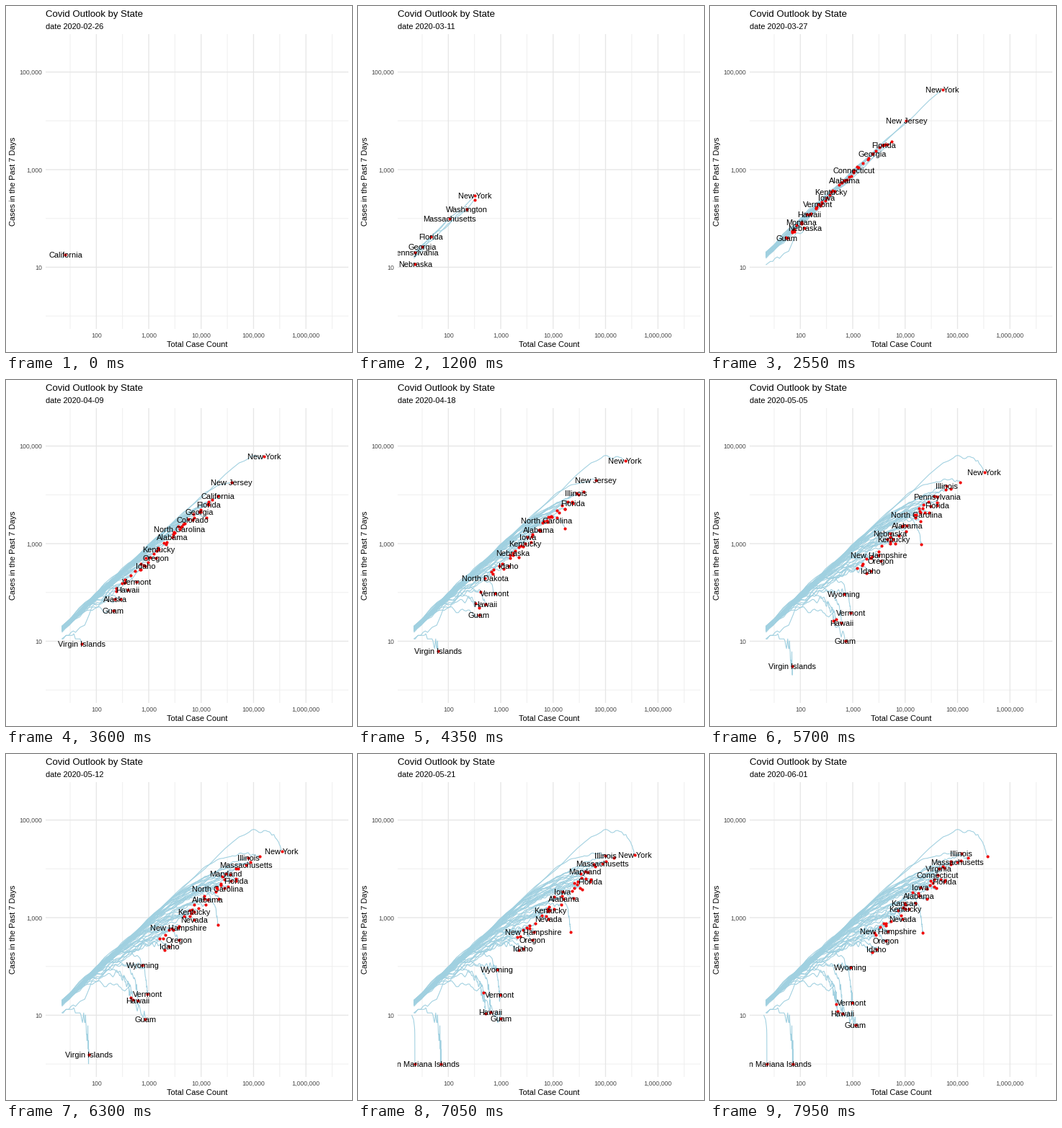
Recreate the animation shown at these times as a matplotlib script. Size 480 px wide and 480 px high, loop 8000 ms.

```python
import numpy as np
import matplotlib.pyplot as plt
from matplotlib.animation import FuncAnimation
from matplotlib.collections import LineCollection

plt.rcParams["font.family"] = "Liberation Sans"

SIZE, INTERVAL, TICKS = 480, 50, 160
LEFT, RIGHT, TOP, BOTTOM = 55, 474.5, 39, 447.5
X_DECADE, Y_DECADE = 72.7, 67.7
DAYS_PER_STEP, LAST_STEP = 180 / 99, 53
SLOWDOWN, END = 30.9, 96.4      # days: growth starts to ease, last day shown
FIRST_TOTAL = 22
LABEL_HEIGHT = 7.6

rng = np.random.default_rng(7)
states = []


def x_of(total):
    return 125.3 + X_DECADE * (np.log10(total) - 2)


def y_of(weekly):
    return 362 - Y_DECADE * (np.log10(weekly) - 1)


def add_state(name, early, late, since=None, drop=None):
    """Path from totals on the slowdown day and the last day.

    Growth is exponential from day `since`, then decays. The weekly count falls
    below the total by `drop` pixels, more where the growth left is small.
    """
    x_first, x_early, x_late = x_of(FIRST_TOTAL), x_of(early), x_of(late)
    if since is None:
        since = SLOWDOWN - (x_early - x_first) / (5 + (x_early - x_first) / 32)
    days = np.concatenate([[since], np.arange(np.floor(since) + 1, 99)])

    peak = max(SLOWDOWN, since)
    rate = (x_early - x_first) / max(peak - since, 1)
    after = np.clip(days - peak, 0, END - peak)
    span = x_late - x_early
    k = np.clip(4 / span, 0.03, 1)
    eased = (1 - np.exp(-k * after)) / (1 - np.exp(-k * (END - peak)))
    x = x_early - rate * np.maximum(peak - days, 0) + span * eased

    # A steady rate fixes the share of all cases that fall in one week.
    early_drop = -Y_DECADE * np.log10(1 - 10 ** (-7 * max(rate, 3) / X_DECADE))
    late_drop = drop or min(6 + 5200 / span, 125)
    fall = np.sin(np.pi / 2 * after / (END - peak))
    total = 10 ** (2 + (x - 125.3) / X_DECADE)
    gap = early_drop + (late_drop - early_drop) * fall
    weekly = total * 10 ** (-gap / Y_DECADE)

    noise = np.convolve(rng.normal(size=len(days) + 2), [0.5, 0.7, 0.5], "valid")
    sigma = np.minimum(0.012 + 0.25 / np.sqrt(weekly), 0.2)
    ramp = np.minimum((days - since) / 6, 1)
    weekly = np.maximum(np.round(weekly * 10 ** (sigma * noise * ramp)), 1)
    states.append((name, days, np.column_stack([x, y_of(weekly)])))


# Totals in late March and on 1 June; earlier states win when labels overlap.
add_state("Alabama", 705, 18400)
add_state("Florida", 3900, 55800, since=11.8)
add_state("Guam", 56, 1130, drop=146)
add_state("Hawaii", 149, 640)
add_state("Kentucky", 386, 10100)
add_state("Iowa", 320, 19600)
add_state("Idaho", 256, 2840)
add_state("Illinois", 3230, 119000)
add_state("North Carolina", 937, 29600)
add_state("Connecticut", 1064, 42000)
add_state("Georgia", 2424, 47600, since=13.2)
add_state("Ohio", 1031, 35800)
add_state("Colorado", 2005, 26100)
add_state("Indiana", 1208, 33600)
add_state("New Jersey", 10750, 159000, since=14.6)
add_state("Vermont", 219, 970)
add_state("Nebraska", 120, 13900, since=14)
add_state("Alaska", 77, 482)
add_state("Massachusetts", 4160, 98600, since=7.5)
add_state("Michigan", 3660, 57600)
add_state("Maryland", 776, 52400)
add_state("Montana", 105, 514)
add_state("Nevada", 622, 8900)
add_state("New Hampshire", 256, 4730)
add_state("Oregon", 412, 4300)
add_state("Maine", 205, 2350)
add_state("Puerto Rico", 77, 3910)
add_state("North Dakota", 53, 2590)
add_state("New York", 52400, 374000, since=6)
add_state("Pennsylvania", 2350, 74300, since=14.4)
add_state("Virginia", 603, 44700)
add_state("Wyoming", 70, 910)
add_state("Kansas", 199, 9800)
add_state("Northern Mariana Islands", 20, 23, since=79)
add_state("Virgin Islands", 22, 72, since=31.5)
add_state("Louisiana", 2750, 39400)
add_state("California", 5530, 115000, since=-0.9)
add_state("Washington", 4570, 21600, since=2)

# The mid-sized states, crowded together, carry no label.
for early in np.geomspace(70, 1950, 17):
    add_state("", early, early * rng.uniform(18, 48))


fig = plt.figure(figsize=(SIZE / 72, SIZE / 72), dpi=72, facecolor="white")
ax = fig.add_axes([LEFT / SIZE, 1 - BOTTOM / SIZE,
                   (RIGHT - LEFT) / SIZE, (BOTTOM - TOP) / SIZE])
ax.set_xlim(LEFT, RIGHT)
ax.set_ylim(BOTTOM, TOP)
ax.axis("off")


def outer_text(x, y, s, size=11, color="black", **kw):
    return ax.text(x, y, s, fontsize=size, color=color, **kw)


def grid_line(xs, ys, major):
    ax.plot(xs, ys, color="#e6e6e6" if major else "#efefef",
            lw=1.3 if major else 1, snap=False, zorder=1 if major else 0)


for k in range(-1, 10):
    x = 125.3 + X_DECADE / 2 * k
    grid_line([x, x], [TOP, BOTTOM], k % 2 == 0)
    if k % 2 == 0:
        outer_text(x, 460, f"{10 ** (2 + k // 2):,}", 8.8, "#4d4d4d", ha="center")
for k in range(6):
    y = 91.6 + Y_DECADE * k
    grid_line([LEFT, RIGHT], [y, y], k % 2 == 0)
    if k % 2 == 0:
        outer_text(50, y + 3.4, f"{10 ** (5 - k):,}", 8.8, "#4d4d4d", ha="right")

outer_text(55, 15, "Covid Outlook by State", 13.2)
subtitle = outer_text(55, 32, "")
outer_text(265, 473, "Total Case Count", ha="center")
outer_text(15, 243, "Cases in the Past 7 Days", rotation=90, ha="right", va="center")

trails = LineCollection([], colors="#a0d0e0", linewidths=1.07, zorder=2)
ax.add_collection(trails, autolim=False)
dots = ax.scatter([], [], s=17, c="#f00000", linewidths=0, zorder=3)
labels = [ax.text(0, 0, name, fontsize=11, ha="center", clip_on=True, zorder=4)
          for name, _, _ in states]
renderer = fig.canvas.get_renderer()
widths = [label.get_window_extent(renderer).width if label.get_text() else 0
          for label in labels]


def date_text(day):
    month, date = 2, 26 + day
    for length in (29, 31, 30, 31):
        if date <= length:
            break
        month, date = month + 1, date - length
    return f"date 2020-{month:02d}-{date:02d}"


def update(tick):
    day = min(tick // 3, LAST_STEP) * DAYS_PER_STEP
    subtitle.set_text(date_text(int(day + 1e-9)))
    lines, tips, placed = [], [], []
    for (name, days, path), label, width in zip(states, labels, widths):
        label.set_visible(False)
        if day < days[0]:
            continue
        x, y = (np.interp(day, days, path[:, i]) for i in (0, 1))
        lines.append(np.vstack([path[days <= day], [x, y]]))
        tips.append((x, y))
        if name and all(abs(x - px) >= (width + pw) / 2 or abs(y - py) >= LABEL_HEIGHT
                        for px, py, pw in placed):
            placed.append((x, y, width))
            label.set_position((x, y + 4))
            label.set_visible(True)
    trails.set_segments(lines)
    dots.set_offsets(tips)
    return [trails, dots, subtitle, *labels]


anim = FuncAnimation(fig, update, frames=TICKS, interval=INTERVAL,
                     repeat=True, repeat_delay=0, blit=False)
plt.show()
```
